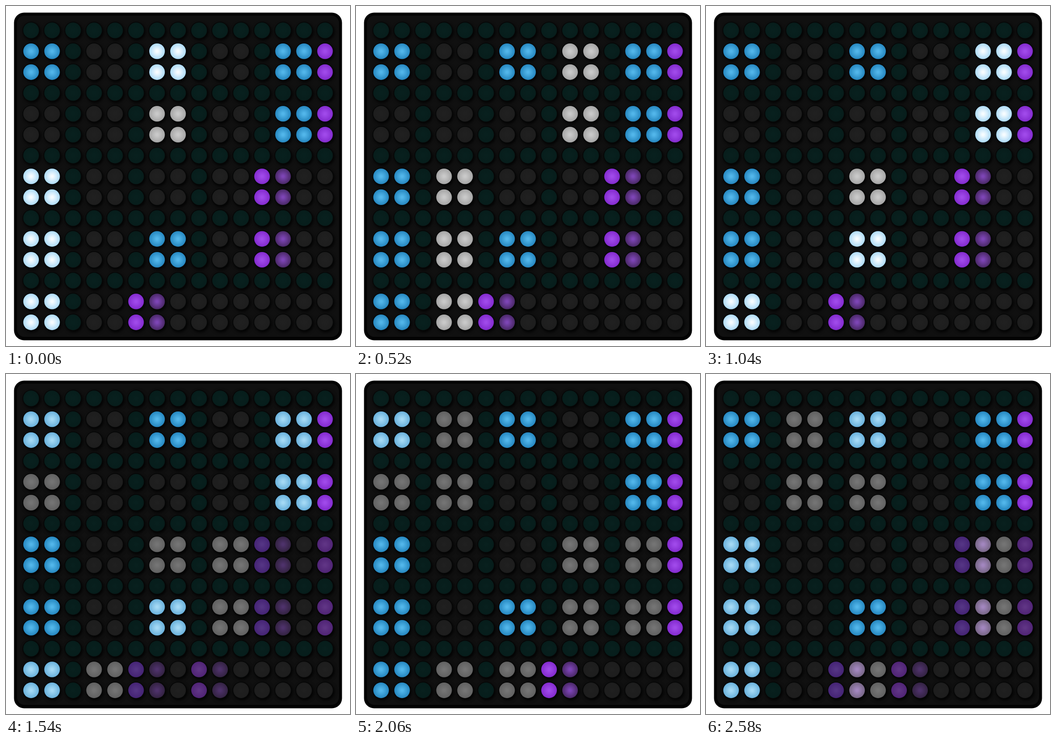
These frames come from a looping animation (752 by 745 pixels, 2.6 s). An HTML page with a canvas:

```html
<!DOCTYPE html>
<html lang="en">
<head>
<meta charset="utf-8">
<title>Step sequencer pads</title>
<style>
  html, body { margin: 0; width: 100%; height: 100%; overflow: hidden; background: #fff; }
  canvas { position: absolute; left: 0; top: 0; width: 752px; height: 745px; }
  .step { opacity: 0; animation: step 2600ms step-end infinite; }
  .last { animation-name: last; }
  /* Each step fades in through one 20 ms half mix, then holds for 500 ms. */
  @keyframes step {
    0% { opacity: .5; }
    .769% { opacity: 1; }
    20.769%, 100% { opacity: 0; }
  }
  /* The last step mixes back into the first one, which lies beneath it. */
  @keyframes last {
    0% { opacity: .5; }
    .769% { opacity: 1; }
    19.999% { opacity: .5; }
    20.769%, 100% { opacity: 0; }
  }
</style>
</head>
<body>
<script>
const WIDTH = 752, HEIGHT = 745, SIZE = 15;
const STEP_MS = 520, MIX_MS = 20, LOOP_MS = 2600;

// Centre and edge colour of each kind of pad
const PADS = {
  teal: ['#08201e', '#071d1b'],
  off: ['#202020', '#1d1d1d'],
  note: ['#52b6ea', '#2384bd'],
  hit: ['#f6fcff', '#a9d9f7'],
  head: ['#c9c9c9', '#a3a3a3'],
  end: ['#a04aea', '#8129cc'],
  tail: ['#7d45b5', '#472763']
};

// heads: playing column per step; ends: end marker column before and after the change
const TRACKS = [
  { row: 1, notes: [0, 6, 12], heads: [6, 9, 12, 0, 3], ends: [14, 14] },
  { row: 4, notes: [12], heads: [6, 9, 12, 0, 3], ends: [14, 14] },
  { row: 7, notes: [0], heads: [0, 3, 6, 9, 12], ends: [11, 14] },
  { row: 10, notes: [0, 6], heads: [0, 3, 6, 9, 12], ends: [11, 14] },
  { row: 13, notes: [0], heads: [0, 3, 0, 3, 6], ends: [5, 8] }
];

function padKind(row, col, step) {
  if (row % 3 === 0) return 'teal';
  const track = TRACKS[Math.floor(row / 3)];
  const end = track.ends[step < 3 ? 0 : 1];
  if (col === end) return 'end';
  if (col === end + 1) return 'tail';
  if (col > end) return 'off';
  if (col % 3 === 2) return 'teal';
  const cell = col - col % 3;
  const noted = track.notes.includes(cell);
  if (cell === track.heads[step]) return noted ? 'hit' : 'head';
  return noted ? 'note' : 'off';
}

function eachPad(draw) {
  for (let row = 0; row < SIZE; row++)
    for (let col = 0; col < SIZE; col++)
      draw(54.8 + col * 45.9, 53.4 + row * 45.69, row, col);
}

function disc(ctx, x, y, r, fill) {
  ctx.fillStyle = fill;
  ctx.beginPath();
  ctx.arc(x, y, r, 0, Math.PI * 2);
  ctx.fill();
}

function panel(ctx, x, y, w, h, r, fill) {
  ctx.fillStyle = fill;
  ctx.beginPath();
  ctx.roundRect(x, y, w, h, r);
  ctx.fill();
}

function drawBoard(ctx) {
  ctx.fillStyle = '#fff';
  ctx.fillRect(0, 0, WIDTH, HEIGHT);
  panel(ctx, 17.5, 14.5, 717, 718, 22, '#020202');
  panel(ctx, 24, 21, 704, 704, 16, '#101010');
  ctx.save();
  ctx.shadowColor = 'rgba(0, 0, 0, .9)';
  ctx.shadowBlur = 6;
  ctx.shadowOffsetX = 2;
  ctx.shadowOffsetY = 3;
  eachPad((x, y) => disc(ctx, x, y, 18.8, '#060707'));
  ctx.restore();
}

function drawPad(ctx, x, y, [core, rim]) {
  const glow = ctx.createRadialGradient(x, y, 2, x, y, 18);
  glow.addColorStop(0, core);
  glow.addColorStop(1, rim);
  disc(ctx, x, y, 17.1, glow);
}

for (let step = 0; step < 5; step++) {
  const canvas = document.createElement('canvas');
  canvas.width = WIDTH;
  canvas.height = HEIGHT;
  if (step > 0) {
    canvas.className = step === 4 ? 'step last' : 'step';
    canvas.style.animationDelay = `${step * STEP_MS - MIX_MS - LOOP_MS}ms`;
  }
  const ctx = canvas.getContext('2d');
  drawBoard(ctx);
  eachPad((x, y, row, col) => drawPad(ctx, x, y, PADS[padKind(row, col, step)]));
  document.body.append(canvas);
}
</script>
</body>
</html>
```
